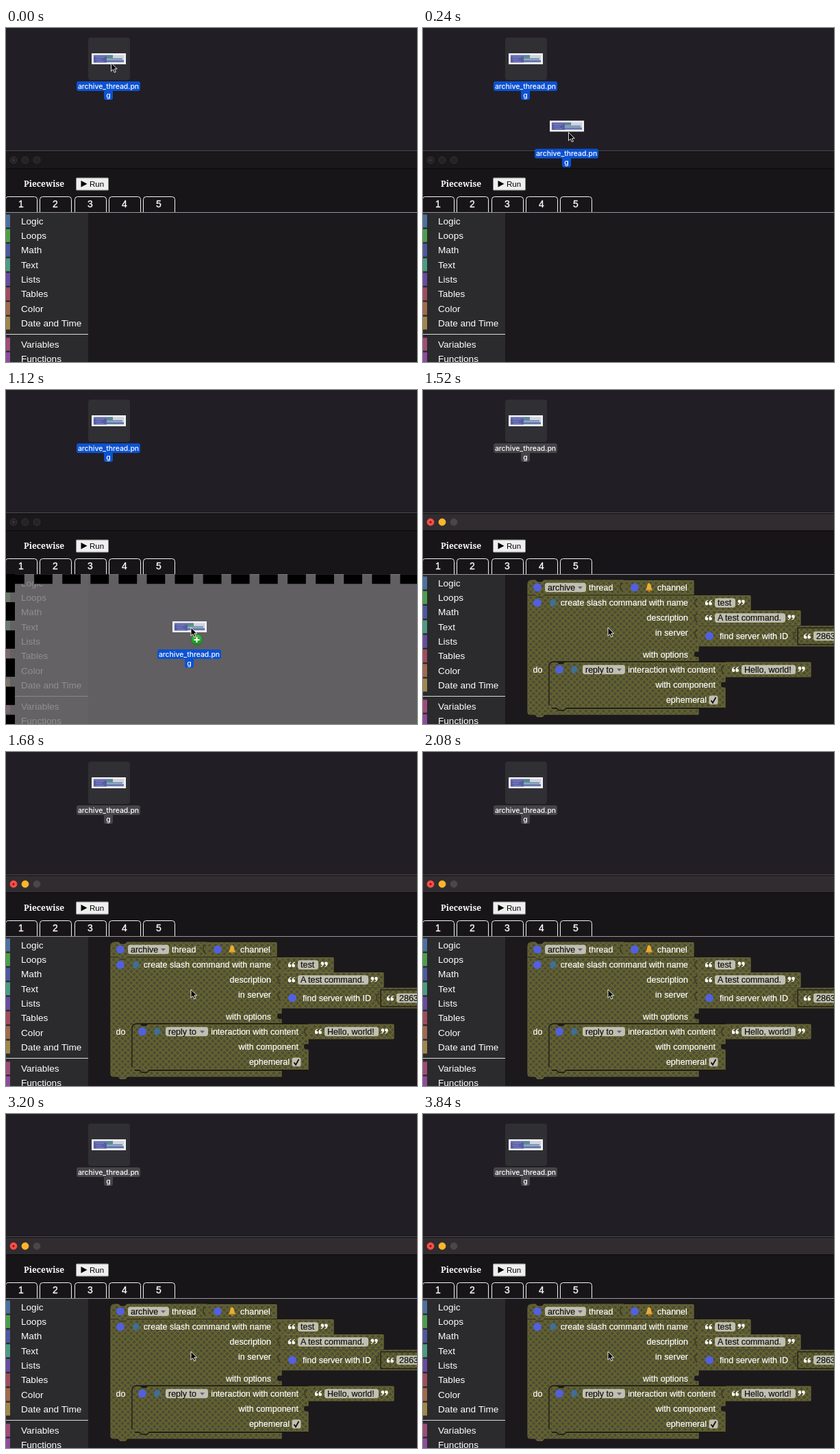
An HTML page that plays this animation: 600 px wide and 488 px high, repeating every 3880 ms.

```html
<!DOCTYPE html>
<html lang="en">
<head>
<meta charset="utf-8">
<title>Drag a block image into the workspace</title>
<style>
  html, body { margin: 0; width: 100%; height: 100%; overflow: hidden; background: #211e25; }
  svg { display: block; width: 600px; height: 488px; }
  text { fill: #fff; font-family: "Liberation Sans", Arial, sans-serif; white-space: pre; }
  .label { font: 500 10.4px Inter, sans-serif; text-anchor: middle; }
  .brand { font: 700 12px "Noto Serif", serif; }
  .tabs text { font-size: 14px; text-anchor: middle; stroke: #fff; stroke-width: .3; }
  .menu text { font-size: 13.6px; }
  .blocks text { font-size: 12.5px; stroke: #fff; stroke-width: .2; }
  .blocks text.dark { fill: #111; stroke: #111; }
  .blocks text.end { text-anchor: end; }
</style>
</head>
<body>
<svg viewBox="0 0 600 488">
  <defs>
    <pattern id="hatch" width="8.5" height="8.5" patternUnits="userSpaceOnUse" x="153" y="278">
      <rect width="8.5" height="8.5" fill="#4b4a38"/>
      <path d="M0 0L8.5 8.5M8.5 0L0 8.5" stroke="#66652c" stroke-width="1.9"/>
    </pattern>
    <linearGradient id="leaf" x2="0" y2="1">
      <stop stop-color="#4cc04a"/><stop offset="1" stop-color="#148a1c"/>
    </linearGradient>
    <g id="thumb">
      <rect x="125" y="37" width="50" height="16" fill="#f4f4f6"/>
      <rect x="127.500" y="39.500" width="45" height="11" fill="#cfd3e0"/>
      <rect x="128" y="40" width="19" height="10.500" fill="#565da4"/>
      <rect x="128" y="39.500" width="28" height="2.500" fill="#6a70b4"/>
      <rect x="147" y="41" width="9" height="3" fill="#4f9482"/>
      <rect x="147" y="44" width="23" height="2.500" fill="#7c98b4"/>
      <rect x="147" y="47" width="25" height="3" fill="#6877ae"/>
      <path d="M131 43h12M131 46h9M132 49h11" stroke="#8289c4"/>
    </g>
    <g id="name">
      <path d="M106 78h87a3 3 0 0 1 3 3v8a3 3 0 0 1-3 3h-37v10a3 3 0 0 1-3 3h-7a3 3 0 0 1-3-3v-10h-37a3 3 0 0 1-3-3v-8a3 3 0 0 1 3-3z"/>
      <text class="label" x="149.500" y="88.700">archive_thread.pn</text>
      <text class="label" x="149.500" y="101.700">g</text>
    </g>
  </defs>

  <rect width="600" height="488" fill="#211e25"/>
  <rect x="120" y="14" width="61" height="62" rx="4" fill="#302f33"/>
  <use href="#thumb"/>
  <use id="file" href="#name"/>

  <rect id="bar" y="180" width="600" height="26"/>
  <rect y="179" width="600" height="1" fill="#514e52"/>
  <rect y="180" width="600" height="1" fill="#0c0b0c"/>
  <rect y="205" width="600" height="1" fill="#0a090a"/>
  <g id="lights"></g>

  <rect y="206" width="600" height="282" fill="#171518"/>
  <rect y="269" width="600" height="219" fill="#1b191b"/>
  <text class="brand" x="26" y="232">Piecewise</text>
  <rect x="102.500" y="219" width="47" height="18" rx="1" fill="#efefef" stroke="#8a8a8a"/>
  <path d="M109.500 223v9.500l9-4.750z" fill="#000"/>
  <text x="122" y="232" font-size="11.500" style="fill:#000">Run</text>
  <g id="tabs" class="tabs"></g>
  <path d="M0 269.500H600" stroke="#98969a"/>

  <g id="blocks" class="blocks"></g>
  <g id="menu" class="menu"></g>

  <g id="drop">
    <rect y="269" width="600" height="219" fill="#737173" fill-opacity=".8"/>
    <g stroke="#000" stroke-dasharray="26.800 14.300">
      <path d="M0 276.200H600" stroke-width="14"/>
      <path d="M6.500 269V488" stroke-width="13"/>
    </g>
  </g>

  <g id="ghost">
    <use href="#thumb"/>
    <use href="#name" fill="#0b52d2"/>
  </g>
  <g id="cursor">
    <g id="plus">
      <circle cx="8.500" cy="18" r="8" fill="url(#leaf)" stroke="#1d6a22" stroke-width=".6"/>
      <path d="M4.500 18h8M8.500 14v8" stroke="#fff" stroke-width="2"/>
    </g>
    <path d="M0 0V12.200L2.800 9.600L4.800 14L6.800 13.100L4.900 8.800H8.700Z" fill="#000" stroke="#fff" stroke-width=".9"/>
  </g>
</svg>

<script>
const $ = id => document.getElementById(id);
const LOOP = 3880, DROP = 1240, PAGE_TOP = 206;

// window controls, tabs and category menu
$('lights').innerHTML = [11, 28, 45].map(x =>
  `<circle cx="${x}" cy="193" r="5" stroke-width=".8"/>`).join('') +
  '<circle cx="11" cy="193" r="1.6"/>';

$('tabs').innerHTML = [0, 1, 2, 3, 4].map(i => {
  const x = Math.round(i * 50.3) - .5;
  return `<path d="M${x} 269V250.500a4 4 0 0 1 4-4H${x + 42}a4 4 0 0 1 4 4V269"
    fill="#171518" stroke="#f2f2f2"/><text x="${x + 22.5}" y="262">${i + 1}</text>`;
}).join('');

const menu = [
  ['Logic', '#4c70a0'], ['Loops', '#4b9f4a'], ['Math', '#4c589f'], ['Text', '#4a9c82'],
  ['Lists', '#664da0'], ['Tables', '#a04c5c'], ['Color', '#a06a4c'], ['Date and Time', '#a0884a'],
  ['Variables', '#a04c78'], ['Functions', '#8d4ca0']
];
$('menu').innerHTML = '<rect y="270" width="120" height="218" fill="#2b2a2d"/>' +
  menu.map(([name, color], i) => {
    const y = 282 + i * 21.3 + (i > 7 ? 9.6 : 0);
    return `<rect y="${y - 9.5}" width="6" height="19" fill="${color}"/>
      <text x="22" y="${y + 4.8}">${name}</text>`;
  }).join('') + '<path d="M0 447.500H120" stroke="#dcdcdc"/>';

// block parts; y is the middle of the row
const shape = d => `<path d="${d}" fill="url(#hatch)" stroke="#67663a" stroke-width="1.2"/>`;
const box = (x, y, w, h) =>
  `<rect x="${x}" y="${y}" width="${w}" height="${h}" rx="1" fill="url(#hatch)" stroke="#67663a" stroke-width="1.2"/>`;
const say = (x, y, s, c = '') => `<text class="${c}" x="${x}" y="${y + 4.4}">${s}</text>`;
const pill = (x, y, w, s) =>
  `<rect x="${x}" y="${y - 6.7}" width="${w}" height="13.4" rx="3.4" fill="#c0bfb0"/>` + say(x + 4, y, s, 'dark');
const pick = (x, y, w, s) => pill(x, y, w, s) +
  `<path d="M${x + w - 12} ${y - 1.5}h7l-3.5 4z" fill="#66658c"/>`;
const dot = (x, y) => `<circle cx="${x}" cy="${y}" r="6" fill="#5260df"/>`;
const joint = (x, y) =>
  `<path d="M${x} ${y - 6}q-5 1-4 6t4 6" fill="none" stroke="#36351f" stroke-width="1.3"/>`;
const socket = (x, y) =>
  `<path d="M${x + 1} ${y - 6}c0 5-7-2-7 5.500s7 1 7 6z" fill="#1b191b"/>`;
const mark = (x, y, turn) => `<g transform="translate(${x} ${y}) rotate(${turn})" fill="#fff">` +
  [-2.8, 2.8].map(k => `<path d="M${k + 1.8}-4.200q-4.400 1.400-4.200 5.400a2.300 2.300 0 1 0 2-2.200q.2-1.500 2.600-2.400z"/>`).join('') + '</g>';
const head = (x, y) => `<g transform="translate(${x} ${y})">
  <path d="M-5-1a5 4.600 0 0 1 8.500-3l1.500 3.500-1.500.8v2.700h-3v2.500h-4.500v-3z" fill="#3f6f94"/>
  <path d="M4.500 2l2-.8M4.300 3.800l2 1" stroke="#56809f" stroke-width=".9"/></g>`;
const bell = (x, y) => `<g transform="translate(${x} ${y})" fill="#e9ad35">
  <path d="M-5.500 4q2.500-2 2.500-5.500a3 4 0 0 1 6 0q0 3.500 2.500 5.500z"/>
  <circle cy="-5.300" r="1.200"/><circle cy="4.800" r="1.700" fill="#c07c1e"/></g>`;
const quoted = (x, y, w, s) =>
  box(x, y - 10.5, w, 21) + mark(x + 14, y, 0) + pill(x + 23, y, w - 45, s) + mark(x + w - 13.5, y - 1, 180);

$('blocks').innerHTML = [
  shape('M153 299V284q0-6 6-6h5l3 3h7l3-3H293V299H177l-3 3h-7l-3-3z'),
  box(294, 278.5, 101, 20.5),
  shape('M153 300.500h11l3 3h7l3-3H402V397H190q-6 0-6 6v57q0 6 6 6H402V474H177l-3 3.500h-7l-3-3.500H157q-4 0-4-4z'),
  shape('M184.500 464V404q0-6 6-6H195l3 3h7l3-3H441V464H209l-3 3h-8l-3-3H189q-4.500 0-4.500-4z'),
  '<path d="M184 461V404q0-7 7-7H441M188 465h7l3 3h8l3-3H441" fill="none" stroke="#161510" stroke-width="1.300"/>',
  '<path d="M153 299.800h11l3 3h7l3-3H395" fill="none" stroke="#2a291c"/>',

  dot(167, 288.5), pick(178, 288.5, 60, 'archive'), say(242, 288.5, 'thread'), joint(292, 288.5),
  dot(309, 288.5), bell(330, 288.5), say(342, 288.5, 'channel'),

  dot(167, 311), head(190, 311), say(387, 311, 'create slash command with name', 'end'),
  say(387, 333, 'description', 'end'), say(387, 355, 'in server', 'end'),
  say(387, 386.5, 'with options', 'end'), say(160.5, 408.5, 'do'),
  joint(401, 311), joint(401, 333), joint(401, 357), socket(402, 386.5),

  quoted(403, 311, 75, 'test'), quoted(403, 333, 148, 'A test command.'),
  box(403, 345, 210, 29), dot(418, 359.5), say(433, 359.5, 'find server with ID'), joint(545, 359.5),
  '<path d="M600 347.500H547V372H600" fill="url(#hatch)" stroke="#23221a" stroke-width="1.500"/>',
  mark(561, 360, 0), pill(570, 359.5, 60, '2863'),

  dot(199, 408.5), head(221, 408.5), pick(233, 408.5, 62, 'reply to'),
  say(427, 408.5, 'interaction with content', 'end'), say(427, 431, 'with component', 'end'),
  say(414, 453, 'ephemeral', 'end'), joint(440, 408.5), socket(441, 431),
  '<rect x="417.500" y="446.500" width="13" height="13" rx="3" fill="#c0bfb0"/>',
  '<path d="M420.500 453.500l2.500 3.500 4.500-8" fill="none" stroke="#111" stroke-width="1.800"/>',
  quoted(442, 408.5, 124, 'Hello, world!')
].join('');

// motion: the dragged picture trails slightly behind the pointer
const ease = u => {
  u = Math.min(1, Math.max(0, u));
  return u * u * u * (10 + u * (6 * u - 15));
};
const show = (el, on) => el.setAttribute('visibility', on ? 'visible' : 'hidden');
const move = (el, x, y) => el.setAttribute('transform', `translate(${x.toFixed(2)} ${y.toFixed(2)})`);
const paint = (el, fill, stroke = 'none') => {
  el.setAttribute('fill', fill);
  el.setAttribute('stroke', stroke);
};
const lamps = $('lights').children;

function draw(t) {
  const dropped = t >= DROP;
  const settle = t >= 600 ? 1 : 0;
  const across = ease((t - 40) / 400);
  const cy = 51 + 296 * ease((t - 40) / 485);
  const over = !dropped && cy > PAGE_TOP;

  move($('cursor'), 153.5 + 117 * across - settle * .5, cy);
  move($('ghost'), 119 * across - settle, 300 * ease((t - 40) / 495) + settle);
  show($('ghost'), t >= 40 && !dropped);
  show($('plus'), over);
  show($('drop'), over);
  show($('blocks'), dropped);

  $('file').setAttribute('fill', dropped ? '#464449' : '#0b52d2');
  paint($('bar'), dropped ? '#302c30' : '#1a181b');
  ['#fc4f48', '#fdb62c', '#4a474a'].forEach((c, i) =>
    dropped ? paint(lamps[i], c, c) : paint(lamps[i], '#252326', '#3a383b'));
  paint(lamps[3], dropped ? '#7a120e' : '#3e3c3f');
}

const start = performance.now();
function tick() {
  draw((performance.now() - start) % LOOP);
  requestAnimationFrame(tick);
}
draw(0);
requestAnimationFrame(tick);
</script>
</body>
</html>
```
